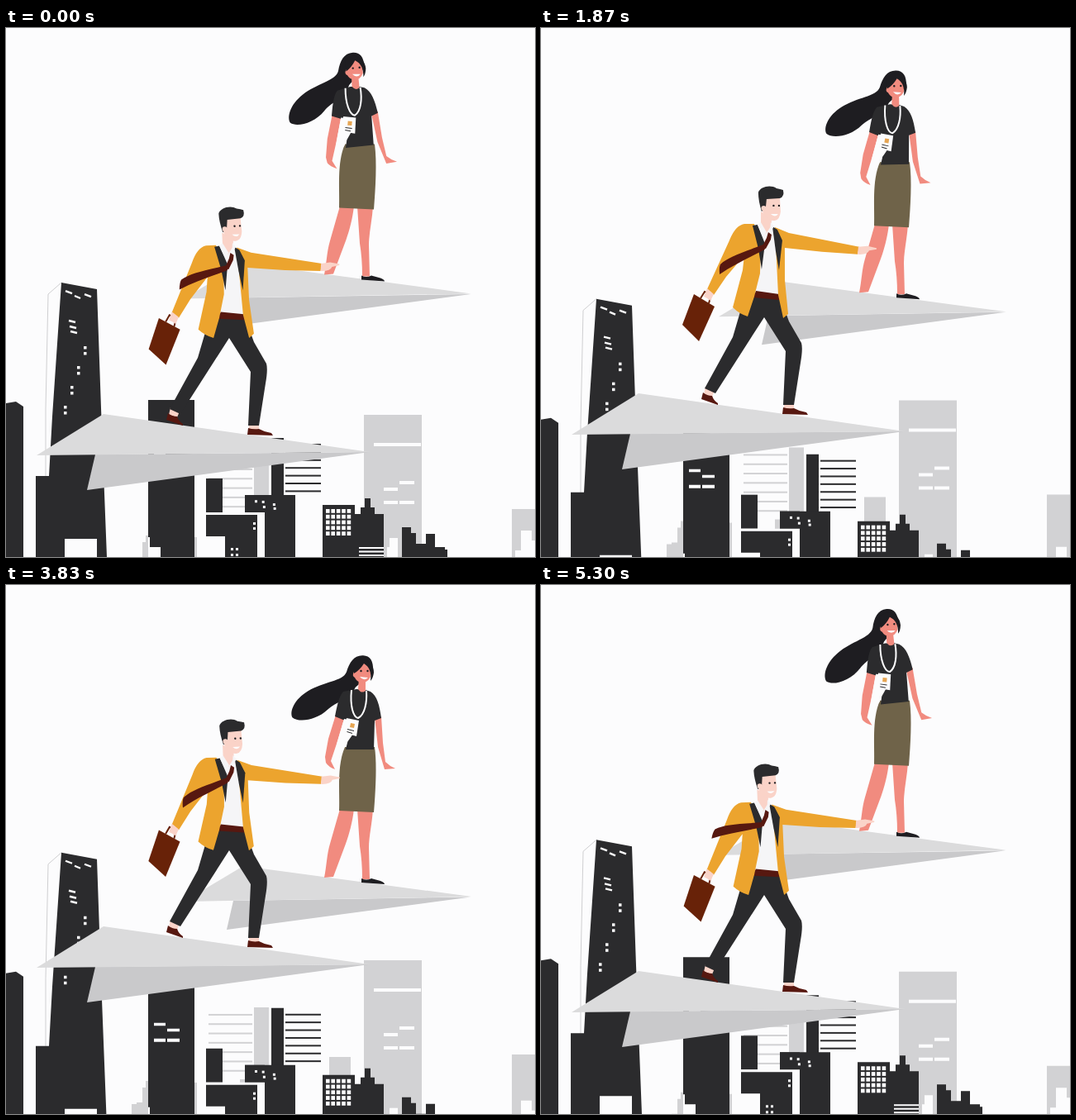
These frames come from a looping animation (640 by 640 pixels, 5.33 s). An HTML page:

```html
<!DOCTYPE html>
<html lang="en">
<head>
<meta charset="utf-8">
<title>Paper planes</title>
<style>
  html, body { margin: 0; width: 100%; height: 100%; overflow: hidden; background: #fcfcfd; }
  svg { display: block; width: 100%; height: 100%; }
  .paper { fill: #fcfcfd; }
  .ink { fill: #2b2b2d; }
  .haze { fill: #d2d2d4; }
  .wing { fill: #dbdbdc; }
  .keel { fill: #c9c9cb; }
  .coat { fill: #eca42e; }
  .wine { fill: #571810; }
  .bag { fill: #682208; }
  .shirt { fill: #f5f5f7; }
  .pale { fill: #fad3c8; }
  .tan { fill: #f18b7f; }
  .skirt { fill: #6f6349; }
  .hair { fill: #1e1d21; }
  .line { fill: none; stroke: #fcfcfd; }
</style>
</head>
<body>
<svg viewBox="0 0 640 640" preserveAspectRatio="none">
  <rect class="paper" width="640" height="640"/>

  <g id="far" class="haze">
    <path d="M433 468H503V700H433Z"/>
    <path d="M612 582H640V700H612Z"/>
    <path d="M300 525H318V700H300Z"/>
    <path d="M391 585H417V700H391Z"/>
    <path d="M152 642H158V640H165V622H169V614H174V700H152Z"/>
    <path d="M221 622H226V616H231V700H221Z"/>
    <path d="M283 612H292V700H283Z"/>
    <path class="paper" d="M445 502H502V506H445ZM476 548H494V552H476ZM457 556H474V560H457ZM457 572H474V576H457ZM476 572H494V576H476Z"/>
    <g id="farLines"></g>
  </g>

  <g id="near" class="ink">
    <path d="M0 454L12 452L21 458V700H0Z"/>
    <path d="M67 308L51 322L48 460V543" fill="none" stroke="#cfcfd1" stroke-width="1"/>
    <path d="M67 308L110 316L115 460L122 640V700H36V542H52L56 470Z"/>
    <path class="paper" d="M71 618H110V700H71Z"/>
    <path class="line" stroke-width="2.4" d="M72 318L80 321M83 324L90 327M95 322L103 325M76 354L84 356M77 361L85 363M78 367L86 369"/>
    <g id="towerLights" class="paper"></g>

    <path d="M172 450H228V700H172Z"/>
    <path class="paper" d="M179 514H193V517.5H179ZM195 521H210V524.5H195ZM179 533H193V537H179ZM195 533H210V537H195ZM172 616H174V628H187V700H172Z"/>

    <path d="M321 496H336V580H321Z"/>
    <g id="nearLines"></g>
    <path d="M242 545H262V586H242Z"/>
    <path d="M289 565H350V700H289Z"/>
    <path class="paper" d="M242 586H313V700H242Z"/>
    <path d="M289 565H313V585H289Z"/>
    <path d="M242 589H304V700H265V615H242Z"/>
    <g id="blockLights" class="paper"></g>

    <path d="M383 577H422V588H429V580H434V569H441V580H446V588H457V700H383Z"/>
    <path class="paper" d="M427 628H457V630H427ZM427 632.5H457V634.5H427ZM427 637H457V639H427Z"/>
    <g id="grid" class="paper"></g>
    <path class="paper" d="M461 628H464V617H474V700H461Z"/>
    <path d="M479 604H490V611H496V624H508V612H519V628H531V631H534V700H479Z"/>
    <path class="paper" d="M616 632H623V608H636V620H640V700H616Z"/>
  </g>

  <g id="rightPlane">
    <path class="keel" d="M275 326L267 361L562 321.500Z"/>
    <path class="wing" d="M287 284L215 327L563 321Z"/>
    <path class="tan" d="M404 215H421C419 232 415 246 411 257L396 297L385 298C388 284 388 270 392 257Z"/>
    <path class="tan" d="M425 215H444C443 232 439 248 439 262L440 300H431C431 285 430 272 428 260Z"/>
    <path class="hair" d="M430 299Q436 302 442 299L453 302Q458 304 458 306L430 304Z"/>
    <path class="skirt" d="M410 140H446C449 162 447 194 445 219L403 217C404 195 400 163 410 140Z"/>
    <g id="woman">
      <path id="mane" class="hair" d="M443 48C443 34 438 29 430 29C419 29 414 38 411 50C407 62 384 63 366 76C350 87 345 102 349 109C357 115 378 111 391 97C402 86 416 84 423 68Z"/>
      <path class="tan" d="M399 101L409 106L400 136L393 157L398 167Q390 164 387 159L386 152L390 130Z"/>
      <path class="tan" d="M446 104L454 103L456 135L459 158Q464 163 471 166L458 167L450 140Z"/>
      <path class="ink" d="M424 70L408 73C402 79 400 94 398 103L410 108Q417 125 411 143H445L446 108L454 105C452 90 449 78 441 73L435 71Z"/>
      <path class="paper" d="M409 106L426 109C423 125 412 132 410 140Q404 146 402 150L400 137Z"/>
      <path class="tan" d="M427 56L426 70Q430 76 435 72V60Z"/>
      <path class="tan" d="M421 49Q428 43 432 37Q440 40 441 48V55Q437 63 430 62Q424 61 422 56Q418 54 421 49Z"/>
      <path class="hair" d="M431 33Q445 37 445 50Q444 57 441 60Q443 45 433 39Q428 47 421 51V36Z"/>
      <circle class="hair" cx="429.500" cy="48" r="1.200"/>
      <circle class="hair" cx="437.500" cy="48" r="1.200"/>
      <path class="paper" d="M428 55L438 56Q433 61 428 55Z"/>
      <path class="line" stroke-width="2" d="M418 71C416 90 420 104 426 105C434 101 437 86 436 72"/>
      <path class="paper" d="M412 105L427 108L424 127L409 123Z"/>
      <path fill="#e6a552" d="M417 111L422 112L421 117L416 116Z"/>
      <path d="M413 118.500L421 120.500M412.500 121.500L419 123.500" stroke="#2b2b2d" stroke-width="1"/>
    </g>
  </g>

  <g id="leftPlane">
    <path class="keel" d="M108 516L98 559L440 513Z"/>
    <path class="wing" d="M118 467L37 517L440 513Z"/>
    <path class="pale" d="M199 459L210 464L207 471L197 468ZM294 476H306V486H294Z"/>
    <path class="wine" d="M196 466Q201 470 207 470Q209 476 214 479V481L194 474Z"/>
    <path class="wine" d="M293 484Q299 486 306 485Q313 489 321 490L323 493L292 492Z"/>
    <path class="ink" d="M257 346L289 350L300 380L315 406Q317 413 314 430L306 481H293L296 416L270 375L211 467L198 461L232 399L242 365Z"/>
    <g id="man">
      <path class="shirt" d="M260 264L279 262L284 290L288 348L259 346L266 300Z"/>
      <path class="wine" d="M260 343L288 347V354L257 351Z"/>
      <path class="coat" d="M246 262L258 262L266 290L265 322L258 350L250 374Q240 371 232 363L244 318L246 300L224 326L209 348L201 341L228 282Q235 264 246 262Z"/>
      <path class="coat" d="M283 266L300 273L385 290L383 299L340 296L295 291V330L299 371L293 376L287 348Z"/>
      <path class="ink" d="M256 264L262 263L271 286L267 317L263 292Z"/>
      <path class="ink" d="M280 265L286 269L292 282L288 318L284 295Z"/>
      <path class="pale" d="M266 247V264L272 274L279 264V255Z"/>
      <path class="shirt" d="M262 263L266 260L273 272L268 277ZM278 260L282 265L277 273Z"/>
      <path class="wine" d="M275 272L279 275L278 281L272 292L267 291L273 279Z"/>
      <path id="tie" class="wine" d="M270 287C240 287 225 286 213 291Q210 294 208 302C228 297 248 296 270 293Z"/>
      <path class="pale" d="M268 230H289L290 247Q289 257 283 258Q275 259 271 251Q266 247 268 241Z"/>
      <path class="ink" d="M263 224C265 217 278 214 285 219Q290 220 293 221Q295 229 289 231L273 232L272 242L267 247Q263 234 263 224Z"/>
      <circle class="pale" cx="269.500" cy="243" r="3"/>
      <circle class="hair" cx="281.500" cy="240" r="1.200"/>
      <circle class="hair" cx="288" cy="240" r="1.200"/>
      <path class="paper" d="M278 250L287 250Q283 255 278 250Z"/>
      <path class="pale" d="M384 290L395 289L406 291.500V293L397 294.500Q395 300 383 299Z"/>
      <path class="bag" d="M185 347L210 362L191 404L171 384Z"/>
      <path d="M193 352L198 344L206 348L203 358" fill="none" stroke="#682208" stroke-width="2"/>
      <path class="pale" d="M201 340L209 347L205 355L201 352L197 350Z"/>
    </g>
  </g>
</svg>
<script>
const LOOP = 5330;
const GUST = 397;
const el = id => document.getElementById(id);
const wave = x => (1 - Math.cos(2 * Math.PI * x)) / 2;

// Rows and columns of equal rectangles
function tile(id, cols, rows, x, y, dx, dy, w, h) {
  for (let i = 0; i < cols * rows; i++) {
    const px = x + i % cols * dx, py = y + Math.floor(i / cols) * dy;
    el(id).innerHTML += `<rect x="${px}" y="${py}" width="${w}" height="${h}"/>`;
  }
}

let seed = 7;
const random = () => (seed = seed * 16807 % 2147483647) / 2147483647;

function scatter(id, n, x, y, w, h) {
  for (let i = 0; i < n; i++) tile(id, 1, 1, x + w * random(), y + h * (i + random()) / n, 0, 0, 3, 3);
}

tile('farLines', 1, 7, 245, 533, 0, 11.3, 53, 2);
tile('nearLines', 1, 7, 338, 503, 0, 9.4, 43, 2);
tile('grid', 5, 5, 387, 582, 6.4, 6.8, 4.6, 4.8);
for (let i = 0; i < 4; i++) tile('towerLights', 1, 2, 94 - 8 * i, 385 + 24 * i, 0, 7, 3.5, 3.5);
scatter('blockLights', 5, 301, 569, 30, 12);
tile('blockLights', 1, 2, 299, 598, 0, 6, 3, 3);
tile('blockLights', 2, 2, 272, 629, 6, 7, 3, 3);

// Sine easing between turning points [time, height]
function bob(turns, t) {
  const i = turns.findIndex(turn => turn[0] > t);
  const [t0, y0] = turns[i - 1], [t1, y1] = turns[i];
  return y0 + (y1 - y0) * wave((t - t0) / (t1 - t0) / 2);
}
const womanTurns = [[-130, -1], [1150, 56], [2440, -1], [3840, 56], [5200, -1], [6480, 56]];
const manTurns = [[0, 0], [1130, -52], [2340, -12], [3800, -54], [LOOP, 0]];

const shift = (id, y) => el(id).setAttribute('transform', `translate(0 ${y.toFixed(2)})`);
const turn = (id, a, x, y) => el(id).setAttribute('transform', `rotate(${a.toFixed(3)} ${x} ${y})`);

function draw(t) {
  const drift = 1 - Math.abs(1 - 2 * t / LOOP);
  shift('near', 28 * drift);
  shift('far', -25 * drift);

  const sink = bob(womanTurns, t);
  shift('rightPlane', sink);
  shift('leftPlane', bob(manTurns, t));

  turn('woman', -6 * (1 - sink / 56) ** 3, 426, 144);
  turn('man', -2.6 + 2.8 * wave(4 * t / LOOP), 272, 350);

  const gust = wave(t / GUST - 0.26);
  turn('mane', 4 * gust, 425, 65);
  turn('tie', -21 * gust, 270, 290);
}

const start = performance.now();
function tick() {
  draw((performance.now() - start) % LOOP);
  requestAnimationFrame(tick);
}
tick();
</script>
</body>
</html>
```
